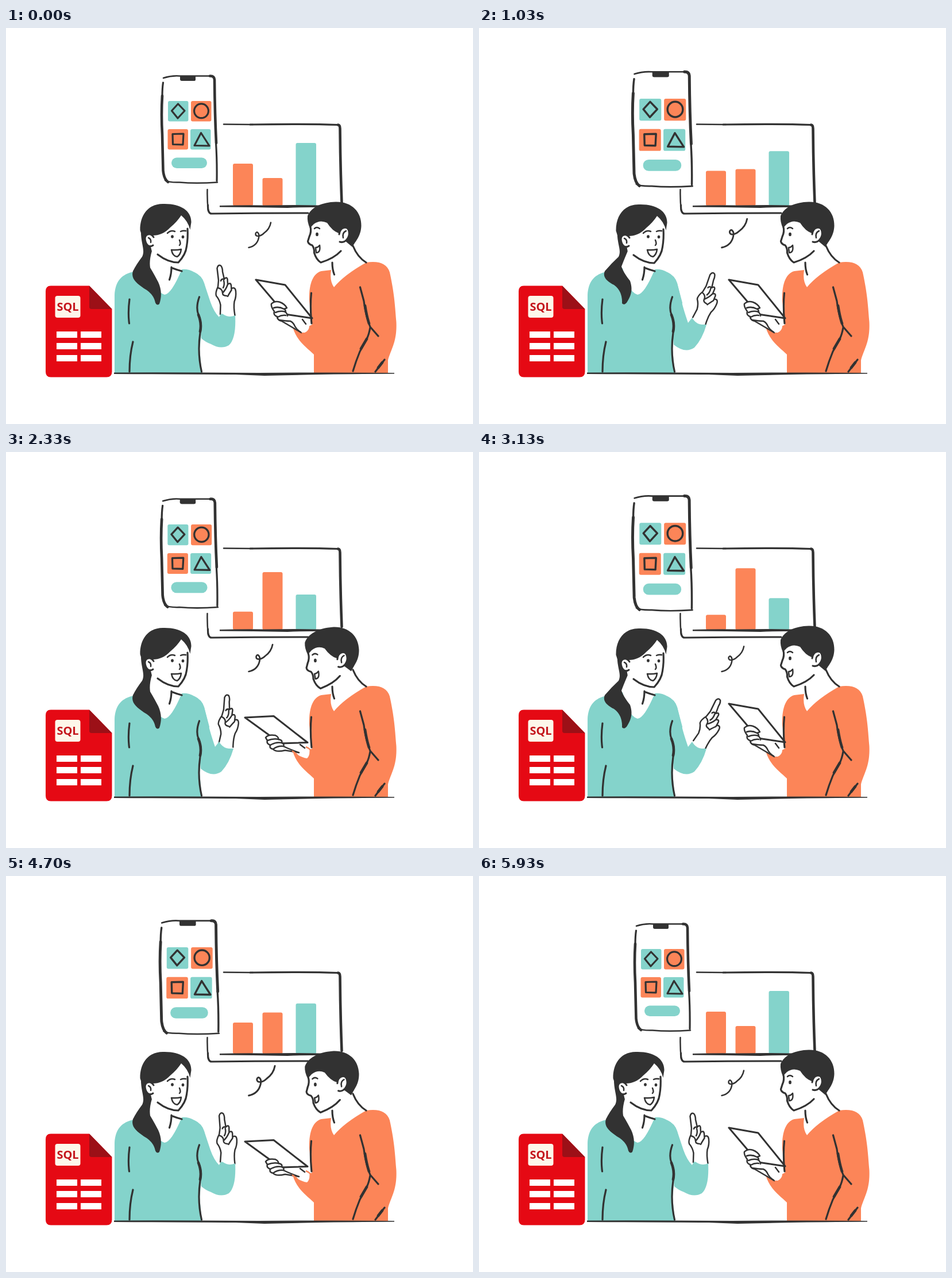
These frames come from a looping animation (813 by 689 pixels, 6010 ms). An HTML page:

```html
<!DOCTYPE html>
<html lang="en">
<head>
<meta charset="utf-8">
<title>Team talk</title>
<style>
  html, body { margin: 0; width: 100%; height: 100%; overflow: hidden; background: #fff; }
  svg { display: block; }
  .ink { fill: none; stroke: #323232; stroke-width: 3.2; stroke-linecap: round; stroke-linejoin: round; }
  .skin { fill: #fff; stroke: #323232; stroke-width: 3; stroke-linecap: round; stroke-linejoin: round; }
  .thin { stroke-width: 2.5; }
  .bold { stroke-width: 4.6; }
  .dark { fill: #323232; }
  .white { fill: #fff; }
  .teal { fill: #84d3cb; }
  .orange { fill: #fc8558; }
  .red { fill: #e50914; }
</style>
</head>
<body>
<svg width="813" height="689" viewBox="0 0 813 689">
  <!-- laptop and chart -->
  <path class="ink thin" d="M379 167.500L430 168M350.500 281Q350 300 352 318"/>
  <path class="ink" d="M425 168Q520 166.500 578 168.500M351.500 308Q351 323 358 323Q440 322 526 322"/>
  <path class="ink bold" d="M578 168.500Q581.500 169 581.500 175Q582 240 584.500 304"/>
  <rect id="bar0" class="orange" x="395" width="35" rx="3"/>
  <rect id="bar1" class="orange" x="446.500" width="35" rx="3"/>
  <rect id="bar2" class="teal" x="504.500" width="35.500" rx="3"/>
  <path class="dark" d="M372 309Q410 308 450 308.500Q520 307 584 309.500L584 312Q540 311 490 313Q430 311.500 372 311.500Z"/>

  <!-- phone -->
  <g id="phone">
    <path class="white" d="M273 84H363L367 268L280 269L273 258Z"/>
    <path class="ink thin" d="M274 87Q288 82.500 302 83.500H358M277 265Q283 269 302 268.500Q330 271 368 268.500"/>
    <path class="ink bold" d="M355 83.500Q362.500 83 363 90Q363.500 150 366 200"/>
    <path class="ink" d="M365.500 200Q367.500 230 367 266M273.500 95Q272 105 272 120"/>
    <path class="ink bold" d="M272 118Q270 150 272 185L273.500 248Q275 263 282 268"/>
    <path class="dark" d="M303 83H330V90Q330 92 327 92H306Q303 92 303 89Z"/>
    <rect class="teal" x="282" y="127" width="35.500" height="35.500" rx="3"/>
    <rect class="orange" x="322" y="127" width="35.500" height="35.500" rx="3"/>
    <rect class="orange" x="281.500" y="176" width="35.500" height="35.500" rx="3"/>
    <rect class="teal" x="321" y="176" width="35.500" height="35.500" rx="3"/>
    <rect class="teal" x="288" y="225.500" width="62" height="18.500" rx="9.200"/>
    <path class="ink" d="M299.500 132L311 144L299 157L288.500 144ZM290 184.500L309 184L308 203L290.500 202.500ZM339.500 182.500L328 204.500L354 205Z"/>
    <circle class="ink" cx="340" cy="144.300" r="12.400"/>
  </g>

  <path id="curl" class="ink thin" d="M422.500 382Q437 379 440 365C442 357 436 352 434.500 358C434 364 443 363 449 357Q459 350 461 338.500"/>

  <!-- woman -->
  <path class="teal" d="M189 601V465C190 442 200 430 218 425L250 418L258 445Q267 462 276 464Q288 463 306 420Q318 419 328 425Q341 431 345 444L354 478L341 520L337 560L341 601Z"/>
  <g id="hand">
    <path class="white" d="M367 417Q372 410 376 417L380 435L385 435L386 444L392 446L399 455L400 466L397 478L398 510H374L373 480L365 462L370 448Z"/>
    <path class="ink thin" d="M373 498L373.500 482Q372 473 366 466Q364 461 369 450L370 439L367.500 418Q369 411 374 413.500Q377 417 377 424L380 437Q375 436 374 440M380 437Q384 432 385.500 437L386 446Q383 455 377 461M386 446Q391 442 392 448L392.500 456Q388 463 386 467M393 453Q399 450 400 458Q401 468 397.500 476Q396 486 398.500 500M369 452Q377 454 377 461Q377 466 384 466M379 439Q381 447 378 452"/>
  </g>
  <path id="armUp" class="teal" d="M328 425Q341 431 345 444L356 477Q362 494 371 503Q374 495 378 498Q388 505 399 500Q401 540 388 552Q374 560 357 550Q348 547 340 540L335 470Z"/>
  <path id="armOut" class="teal" d="M328 425Q341 431 345 444L353 477Q357 493 364 513L371 504Q377 515 388 516L396 516Q389 541 375 556Q359 567 339 551L335 470Z"/>
  <path class="ink" d="M215 472Q212 495 214.500 514M221 546Q215 570 215 598M336.500 468Q330 486 335 499Q341.500 514 338 530Q333 565 340.500 598"/>
  <path class="ink bold" d="M335 499Q341 514 338 528"/>

  <path class="white" d="M256 378L252 405L262 435L274 463L288 450L306 421L289 417L288 400Z"/>
  <path class="ink" d="M288 416Q288 428 284.500 438M289 417.500Q298 421 306 423"/>
  <path id="tailA" class="dark" d="M235 350C234 375 243 385 237 398Q227 411 221 423C217 436 227 444 240 453Q257 462 260 478Q263 484 267 480C272 465 270 453 265 442Q257 427 251 417Q249 405 254 388L246 360Z"/>
  <path id="tailB" class="dark" d="M241 350C239 375 249 385 243 398Q230 410 219 423C214 434 225 442 235 447Q250 458 249 479Q252 483 257 478C267 463 267 452 263 440Q251 425 248 415Q253 402 259 388L252 360Z"/>
  <g id="womanHead">
    <path class="white" d="M250 358L306 323L318 340L315 382L299 409L280 405L254 389Z"/>
    <path class="dark" d="M233.500 352C233 325 248 306 273 306C304 305 323 318 322.500 338L320.500 351Q317 336 305 326Q298 337 286 347Q273 361 255 361L246 372Q237 366 233.500 352Z"/>
    <path class="skin" d="M257 364C251 355 242 359 242 367C243 377 249 383 256 378"/>
    <path class="ink thin" d="M248 365Q253 367 252 373"/>
    <path class="ink" d="M316 349Q317 365 314.500 380Q313 394 300 408Q282 408 264 394"/>
    <g id="womanFace">
      <path class="ink thin" d="M281 357Q287 351 294 354M304 354Q308 352 313 353M302 369Q305 376 302 378"/>
      <ellipse class="dark" cx="289.500" cy="363" rx="2.400" ry="2.800"/>
      <ellipse class="dark" cx="308" cy="363.500" rx="2.300" ry="2.800"/>
      <path class="skin thin" d="M288 386Q297 387 305 385Q304 394 298 398Q290 397 288 386Z"/>
    </g>
  </g>

  <!-- man -->
  <path class="white" d="M568 404L566 448L572 452L627 409L604 378Z"/>
  <path class="orange" d="M536 601V568C524 556 506 545 499 520L512 526Q523 530 527 519L533 516L528 475C527 446 534 427 549 423L566 421Q563 440 571 451Q588 430 627 408Q661 403 668 425C676 462 677 480 679.500 512C681 546 670 559 665 578V601Z"/>
  <path class="ink" d="M616.500 451L623 475Q626 500 634 520L648 536M634 521Q632 533 628 541L616 563Q609 580 604 597M659 577Q652 586 643 598M531.500 461Q529 485 532 514M604 379Q612 399 627 408M568 408Q568 420 571.500 429"/>
  <path class="ink bold" d="M625 483Q628 502 632 514M628 541L618 558M655 582L648 591"/>
  <g id="manHead">
    <path class="white" d="M531 338L531 356L526 372L535 380L538 397L548 408L574 398L590 376L582 335Z"/>
    <path class="dark" d="M525 327C531 312 550 303 574 302.500C602 302 619 320 618.500 344C618 362 609 370 603 381L591 371L579 357Q568 353 559 339Q547 333 536 341L529 348Q524 337 525 327Z"/>
    <path class="skin" d="M580 359C582 345 595 344 597 354C599 365 590 375 581 372"/>
    <path class="ink thin" d="M592 353Q585 356 587 365"/>
    <path class="ink" d="M530 346Q532 355 528 363L525.500 371Q526 376 533 378Q537 383 536.500 391Q540 403 548 408Q571 401 583 388"/>
    <path class="ink thin" d="M537 349Q541 345 546 349"/>
    <ellipse class="dark" cx="541.500" cy="359" rx="2.400" ry="3.200"/>
    <path class="skin thin" d="M539 382Q543 382 546 378Q548 391 540 391Z"/>
  </g>

  <g id="tabletUp">
    <path class="white" d="M485 498L515 506L528 515Q529 526 520 530Q511 531 504 518Z"/>
    <path class="skin" d="M435 438L486 447L533 505L486 498Z"/>
    <path class="skin thin" d="M462 480Q468 474 477 477Q485 480 489 487L484 489Q488 491 486 494Q490 497 490 501L487 506Q494 511 501 514Q504 524 514 530L480 510Q472 508 472 502Q465 500 467 493Q461 485 462 480Z"/>
    <path class="white" d="M484 500Q496 504 515 506L522 516L517 530Q506 528 500 517Q488 512 482 508Z"/>
    <path class="ink thin" d="M475 508Q488 510 495 510Q500 512 503 519Q507 526 513 529M466 487Q475 484 484 489M469 495Q478 491 487 494M473 503Q480 499 487 500M516 507L522 515"/>
  </g>
  <g id="tabletDown">
    <path class="white" d="M485 506L528 514Q530 528 524 533Q510 531 498 519Z"/>
    <path class="skin" d="M416 462L466 459.500L525 505.500L478 507Z"/>
    <path class="skin thin" d="M452 497Q456 491 469 493Q475 496 474 500Q482 501 480 506Q485 508 483 512Q493 517 510 523L486 519Q470 523 465 517Q458 516 460 510Q453 507 455 502Z"/>
    <path class="ink thin" d="M455 502Q465 498 475 500M460 510Q470 504 480 506M465 517Q473 511 483 512M512 509L520 515"/>
    <path d="M498 520Q507 525 510 532M522 513Q527 515 531 519" fill="none" stroke="#fc8558" stroke-width="2.500"/>
  </g>

  <path class="dark" d="M188 599.500Q300 599 440 600Q580 599 676 600V601.500Q600 602 540 603L450 605L400 603Q320 602.500 188 602Z"/>

  <!-- database file -->
  <path class="red" d="M78 448.500H145L184.500 489V598Q184.500 607.500 175 607.500H78Q69 607.500 69 598V458Q69 448.500 78 448.500Z"/>
  <path fill="#9c1017" d="M145 448.500L184.500 489H149Q145 489 145 485Z"/>
  <rect x="85.500" y="466" width="44" height="38" rx="4" fill="#fdf7ea"/>
  <text x="107.500" y="492" text-anchor="middle" fill="#c4161c" font-family="'Open Sans', 'Noto Sans', sans-serif" font-size="20" font-weight="700">SQL</text>
  <path class="white" d="M88 528h36v11h-36zM130 528h36v11h-36zM88 548h36v11h-36zM130 548h36v11h-36zM88 569h36v11h-36zM130 569h36v11h-36z"/>
</svg>
<script>
  const LOOP = 6010, REST = 5930;
  const el = id => document.getElementById(id);
  const place = (id, value) => el(id).setAttribute('transform', value);
  const show = (id, on) => el(id).style.display = on ? '' : 'none';
  const scaleAt = (id, x, y, s) =>
    place(id, `translate(${x} ${y}) scale(${s}) translate(${-x} ${-y})`);

  // 0 at the start of each cycle, 1 halfway
  const wave = (p, cycles) => (1 - Math.cos(2 * Math.PI * p * cycles)) / 2;
  const secondHalf = (p, cycles) => p * cycles % 1 >= 0.5;

  const barTops = [[236, 283.5], [261, 202], [200, 254.5]];
  const handKeys = [[0, 0], [1030, 26], [2330, 11], [3130, 33], [3830, 16.5], [4700, 2.5], [REST, 0]];

  function handAngle(t) {
    const i = handKeys.findIndex(k => k[0] > t);
    if (i < 1) return 0;
    const [t0, a0] = handKeys[i - 1], [t1, a1] = handKeys[i];
    return a0 + (a1 - a0) * wave((t - t0) / (t1 - t0), 0.5);
  }

  function draw(t) {
    const p = t < REST ? t / LOOP : 0;

    barTops.forEach(([from, to], i) => {
      const top = from + (to - from) * wave(p, 1);
      el('bar' + i).setAttribute('y', top);
      el('bar' + i).setAttribute('height', 309.5 - top);
    });
    scaleAt('phone', 320, 180, 1 + 0.075 * wave(p, 3));
    scaleAt('curl', 422, 382, 1 + 0.19 * wave(p, 2));

    const turned = secondHalf(p, 3);
    show('tailA', !turned);
    show('tailB', turned);
    place('womanHead', turned ? 'translate(5 1)' : '');
    place('womanFace', turned ? 'translate(0 -1)' : '');

    const reach = t >= 600 && t < 4300;
    show('armUp', !reach);
    show('armOut', reach);
    place('hand', `${reach ? 'translate(-3 11) ' : ''}rotate(${handAngle(t)} 386 500)`);

    const looksDown = secondHalf(p, 2);
    place('manHead', looksDown ? 'translate(-1 2) rotate(-3 575 400)' : '');
    show('tabletUp', !looksDown);
    show('tabletDown', looksDown);
  }

  function tick() {
    draw(performance.now() % LOOP);
    requestAnimationFrame(tick);
  }
  tick();
</script>
</body>
</html>
```
